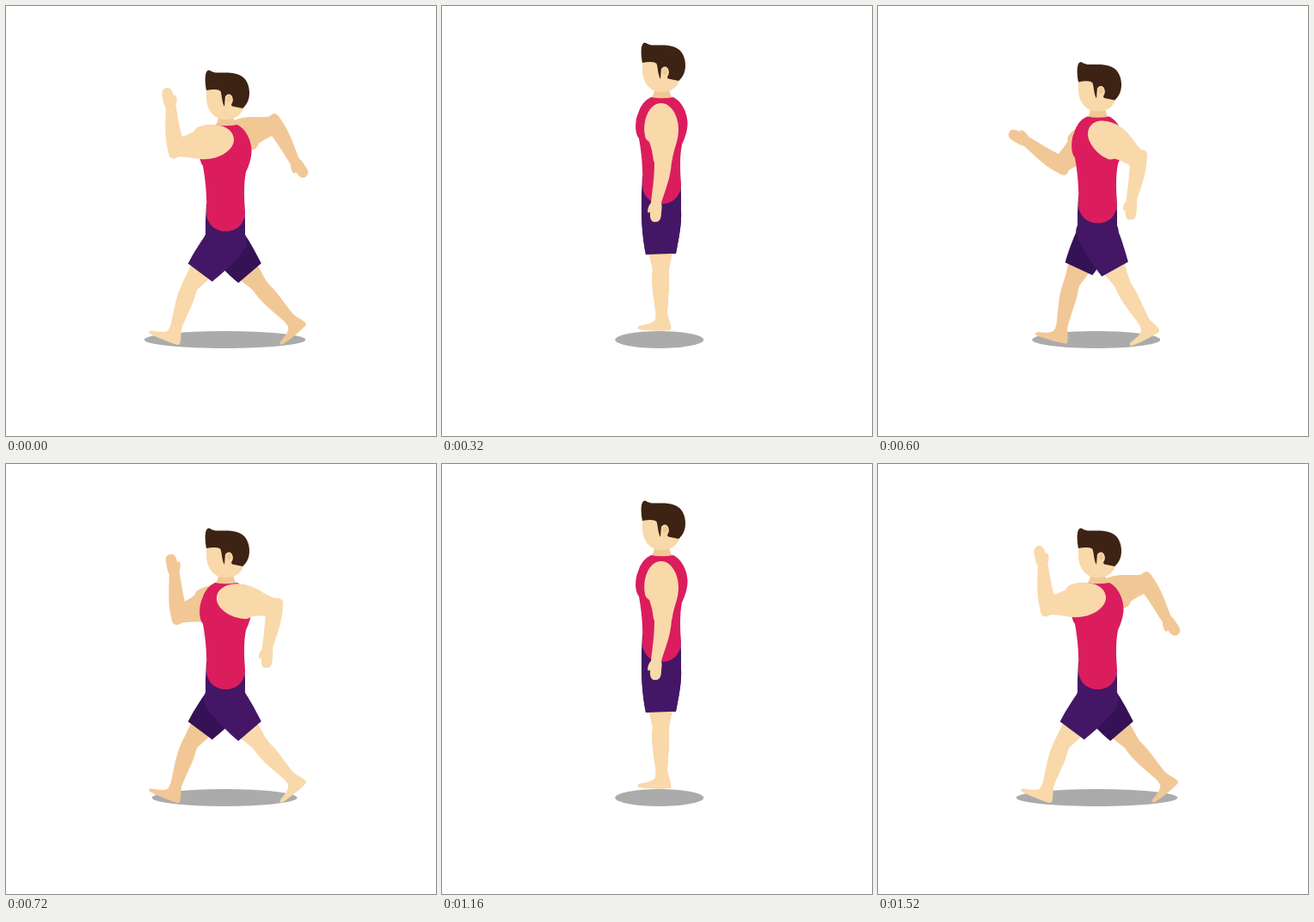
Write an HTML page with a canvas that moves like this. It is 500x500 px and loops after 1640 ms.

```html
<!DOCTYPE html>
<html lang="en">
<head>
<meta charset="utf-8">
<title>Jumping lunge</title>
<style>
  html, body { margin: 0; width: 100%; height: 100%; overflow: hidden; background: #fff; }
  canvas { display: block; width: 500px; height: 500px; }
</style>
</head>
<body>
<canvas id="stage" width="500" height="500"></canvas>
<script>
const ctx = document.getElementById('stage').getContext('2d');
const LOOP = 1640, STEP = 40;
const skin = '#f9d8aa', skinBack = '#f2c796';
const cloth = '#431765', clothBack = '#351156';
const red = '#db1d5d', brown = '#3d2314', grey = '#ababab';

// Limb parts are drawn around their own joint; the trunk and head use stage coordinates.
const shape = {
  upperArm: 'M0-10C12-10 20 6 20 20C20 35 15 40 12.5 57L9 63H-6L-9 57C-10 48-12 40-14 35C-18 32-19 30-19 27C-22 14-16-10 0-10Z',
  forearm: 'M-10 2C-9-6-2-11 3-11Q10-12 10.500-5L10 0C9 18 3 32-2 48C-1 52-1.5 55-2 59C-2 66-4 70-8 70C-14 71-15.500 66-15 58.500L-17 59.500C-19 58-17 51-14 48C-13 37-10 20-10 2Z',
  thigh: 'M-15 38L-14 47L-10 64A9.500 9.500 0 0 0 9 64L12 47L13 38Z',
  shank: 'M-10 0A9.500 9.500 0 0 1 9 0C8 8 9.500 12 9 20L7 49C7 56 10 60 11 66Q12 71 9 71C-4 72-17 71-25 70Q-28 69-27 67C-24 64-12 66-7 59C-6 55-6 51-7 46C-9 30-12 18-10 0Z',
  shortsLeg: 'M-23-5C-23-30 23-30 23-5C24 12 20 30 17 45.800L-18 47C-21 32-23 14-23-5Z',
  pelvis: 'M233 230H277Q278.500 250 278 270L270 285H240L232 270Q231.500 250 233 230Z',
  neck: 'M247 128H264Q265 135 268 139Q256 145 243 139Q247 135 247 128Z',
  tank: 'M243 138Q256 140.500 269 138C279 143 285 156 285.500 167C286 176 282 187 279 193C276 209 277 224 278 240C277 255 267 262 255.500 262C243 262 234 254 233 241C234 222 232 203 229 186C223 179 225 163 228 157Q232 143 243 138Z',
  face: 'M233 95V108C234 122 242 132 255 132C267 132 274 126 277 117L270 92Z',
  hair: 'M233 98C231 88 231 77 234.500 75C237 74 239 77 244 77.500C253 78 263 76.500 271 80C279 83 283 92 283 101C283 109 280 115 275 119L263 116.500L255 104L254 117C251 112 251 103 249.500 99Q246 95.500 233 98Z',
  ear: 'M255 107C255 101 263 101 263.500 107C265 110 262 116 259 117C255 118 255 112 255 107Z',
  earInner: 'M256.500 108C256.500 103 262 103 262 108C262 113 256.500 113 256.500 108Z'
};
for (const name in shape) shape[name] = new Path2D(shape[name]);

function fill(name, color) {
  ctx.fillStyle = color;
  ctx.fill(shape[name]);
}

function at(x, y, degrees, draw) {
  ctx.save();
  ctx.translate(x, y);
  ctx.rotate(degrees * Math.PI / 180);
  draw();
  ctx.restore();
}

// Linear interpolation through [time, value] pairs, holding the last value.
function track(keys, t) {
  for (let i = 1; i < keys.length; i++) {
    const [t0, a] = keys[i - 1], [t1, b] = keys[i];
    if (t < t1) return a + (b - a) * (t - t0) / (t1 - t0);
  }
  return keys[keys.length - 1][1];
}

// Legs: 1 front leg leads, 0 upright, -1 back leg leads. Arms: 1 front arm forward, -1 back arm forward.
const legKeys = [[0, 1], [320, 0], [720, -1], [840, -1], [1160, 0], [1520, 1]];
const armKeys = [[0, 1], [320, 0], [780, -1], [1160, 0], [1520, 1]];
const shadowKeys = [[0, 187.5], [320, 103], [800, 182], [1160, 103], [1520, 187.5]];

function arm(x, y, shoulder, lower, color) {
  at(x, y, shoulder, () => {
    fill('upperArm', color);
    at(2, 58, lower - shoulder, () => fill('forearm', color));
  });
}

function leg(lead, color, shorts) {
  const bend = lead > 0 ? -18.5 * lead : 2.5 * lead;
  at(255, 274, 38.5 * lead, () => {
    fill('thigh', color);
    at(0, 64, bend, () => fill('shank', color));
    fill('shortsLeg', shorts);
  });
}

function draw(t) {
  const lunge = track(legKeys, t), swing = track(armKeys, t), width = track(shadowKeys, t);
  const forward = Math.max(swing, 0), backward = Math.max(-swing, 0);

  ctx.fillStyle = '#fff';
  ctx.fillRect(0, 0, 500, 500);

  ctx.fillStyle = grey;
  ctx.beginPath();
  ctx.ellipse(250.6 + 0.021 * width, 388, width / 2, 10, 0, 0, 2 * Math.PI);
  ctx.fill();

  at(0, -32 * (1 - Math.abs(lunge)), 0, () => {
    arm(256.5, 156, 84 * backward - 106 * forward, 188 * backward - 39 * forward, skinBack);
    leg(-lunge, skinBack, clothBack);
    leg(lunge, skin, cloth);
    fill('pelvis', cloth);
    fill('neck', skinBack);
    fill('tank', red);
    fill('face', skin);
    fill('hair', brown);
    fill('ear', skin);
    fill('earInner', skinBack);
    arm(255, 155, 82 * forward - 87.5 * backward, 163 * forward, skin);
  });
}

const start = performance.now();
function tick() {
  const t = (performance.now() - start) % LOOP;
  draw(Math.floor(t / STEP) * STEP);
  requestAnimationFrame(tick);
}
tick();
</script>
</body>
</html>
```
